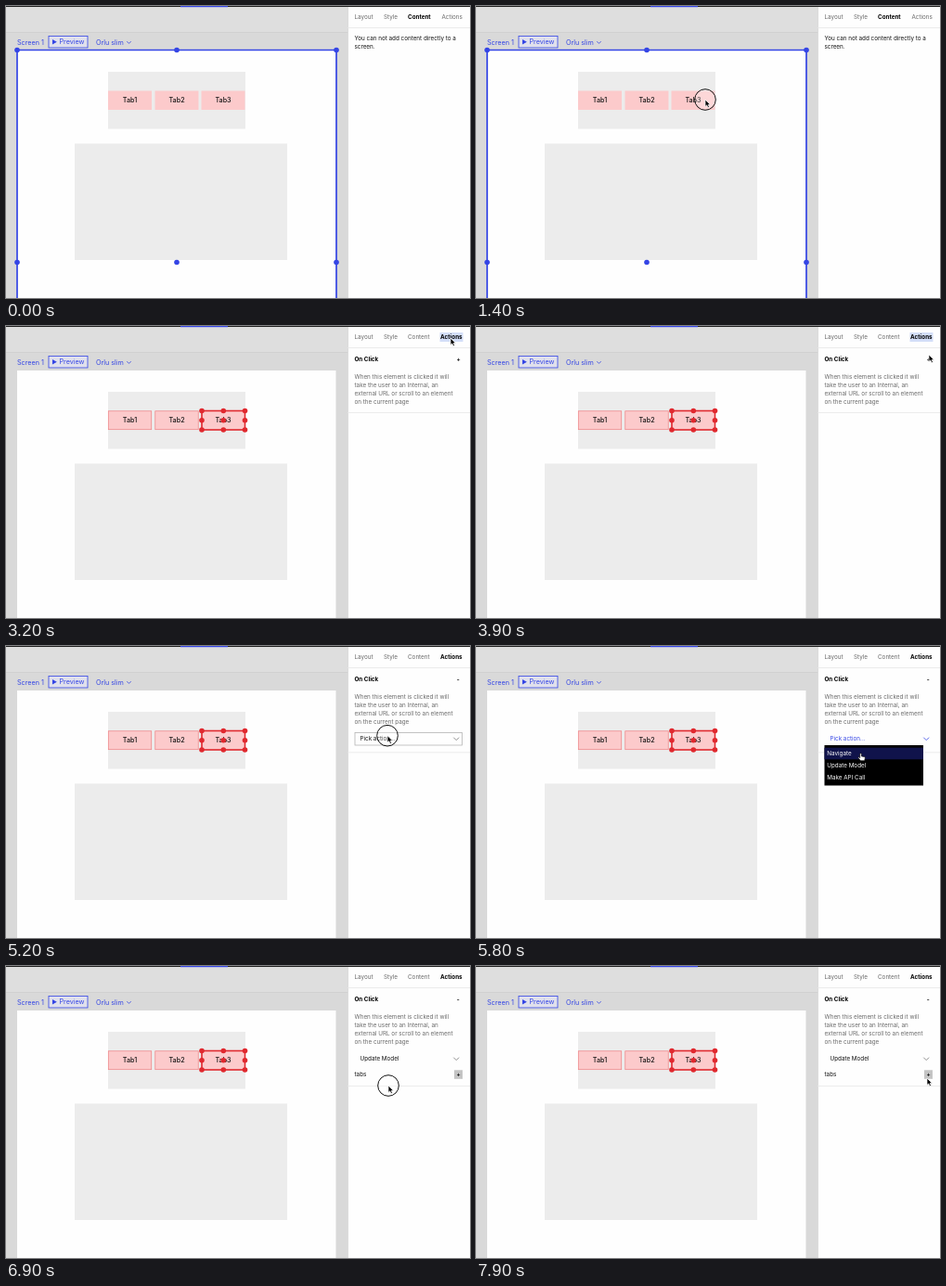
Recreate the animation shown at these times as an HTML page. Size 500 by 315 pixels, loop 8000 ms.

```html
<!DOCTYPE html>
<html lang="en">
<head>
<meta charset="utf-8">
<title>Tab action setup</title>
<style>
html, body { margin: 0; width: 100%; height: 100%; overflow: hidden; background: #fff; }
svg { display: block; width: 500px; height: 315px; }
text { font-family: Inter, "Open Sans", sans-serif; font-size: 6.3px; white-space: pre; }
</style>
</head>
<body>
<svg id="stage" viewBox="0 0 500 315"></svg>
<script>
const LOOP = 8000, STEP = 100;
const BLUE = '#3445e5', RED = '#e0282e', GREY = '#686868', INK = '#111';
const stage = document.getElementById('stage');

function add(parent, tag, attrs, content) {
  const el = document.createElementNS('http://www.w3.org/2000/svg', tag);
  for (const key in attrs) el.setAttribute(key, attrs[key]);
  if (content) el.textContent = content;
  parent.appendChild(el);
  return el;
}
const group = (parent = stage) => add(parent, 'g', {});
const rect = (p, x, y, width, height, fill, more) =>
  add(p, 'rect', { x, y, width, height, fill, ...more });
const dot = (p, cx, cy, r, fill) => add(p, 'circle', { cx, cy, r, fill });
const path = (p, d, stroke, width = 1, fill = 'none') =>
  add(p, 'path', { d, stroke, 'stroke-width': width, fill });
// y is the vertical middle of the capitals
const text = (p, x, y, str, fill = INK, size = 6.3, weight = 400, more) =>
  add(p, 'text', { x, y: y + size * 0.36, fill, 'font-weight': weight,
    style: `font-size:${size}px`, ...more }, str);
const lines = (p, x, y, gap, fill, rows) =>
  rows.forEach((row, i) => text(p, x, y + i * gap, row, fill));

// Editor canvas
rect(stage, 0, 0, 368, 315, '#d9d9d9');
rect(stage, 0, 0, 368, 28, '#dedede');
rect(stage, 0, 28, 368, 1, '#d0d0d0');
rect(stage, 12, 48, 343.5, 267, '#fefefe');
rect(stage, 46, 32.5, 42, 12.5, '#e0e0ec', { stroke: BLUE, 'stroke-width': 0.8 });
path(stage, 'M50 36v5.6l4.8-2.8z', 'none', 0, BLUE);
text(stage, 12, 39, 'Screen 1', BLUE, 7.2);
text(stage, 57.5, 38.8, 'Preview', BLUE, 7.2);
text(stage, 97, 39, 'Orlu slim', BLUE, 7.2);
path(stage, 'M130.3 38.2l2.2 2.2 2.2-2.2', BLUE, 0.8);

rect(stage, 110, 71, 148, 61.5, '#ececec');
rect(stage, 74, 148.5, 229, 125.5, '#ececec');
const tabBoxes = [110, 160.5, 210.5].map((x, i) => {
  const box = rect(stage, x, 91.5, 47, 20.5, '#fccacb');
  text(stage, x + 23.5, 101.5, 'Tab' + (i + 1), INK, 7.2, 500, { 'text-anchor': 'middle' });
  return box;
});

function handles(p, xs, ys, color) {
  for (const x of xs) for (const y of ys) dot(p, x, y, 2.8, color);
}
const screenSel = group();
path(screenSel, 'M12 315V47.5H356V315', BLUE, 1.7);
handles(screenSel, [12, 184, 356], [47.5], BLUE);
handles(screenSel, [12, 184, 356], [276.5], BLUE);

const tabSel = group();
for (const x of [110, 160.5])
  rect(tabSel, x + 0.3, 91.8, 46.4, 19.9, 'none', { stroke: '#ec8588', 'stroke-width': 0.7 });
rect(tabSel, 211, 91.5, 46.5, 20.5, 'none', { stroke: RED, 'stroke-width': 1.6 });
handles(tabSel, [211, 234.3, 257.5], [91.5, 101.7, 112], RED);

// Side panel
rect(stage, 368, 0, 132, 315, '#fefefe');
rect(stage, 368, 0, 0.8, 315, '#d4d4d4');
rect(stage, 368, 23, 132, 0.8, '#e6e6e6');
rect(stage, 0, 0, 500, 1, '#222');
rect(stage, 188, 0, 51, 1.2, BLUE);
const focus = rect(stage, 467.5, 7, 25, 10, '#d3def8');
text(stage, 375.5, 12, 'Layout', GREY);
text(stage, 407, 12, 'Style', GREY);
const contentOn = text(stage, 433, 12, 'Content', '#000', 6.3, 700);
const contentOff = text(stage, 433, 12, 'Content', GREY);
const actionsOn = text(stage, 468, 12, 'Actions', '#000', 6.3, 700);
const actionsOff = text(stage, 469.5, 12, 'Actions', GREY);

const emptyPanel = group();
lines(emptyPanel, 375.5, 35, 9, INK, ['You can not add content directly to a', 'screen.']);

const modelPanel = group();
for (const [name, x, w] of [['Text', 381, 13], ['Api', 428, 10], ['Icons', 445, 17], ['Media', 468, 20]]) {
  text(modelPanel, x, 30.5, name, GREY);
  rect(modelPanel, x, 35.5, w, 0.7, '#aaa');
}
text(modelPanel, 401, 30.5, 'Model', '#000', 6.3, 700);
rect(modelPanel, 400.5, 35.3, 21, 1.3, '#000');
text(modelPanel, 375.5, 49.5, 'Model', '#000', 6.3, 700);
rect(modelPanel, 376, 61, 115.5, 35.5, '#fefefe', { stroke: '#c4c4c4', 'stroke-width': 0.7 });
rect(modelPanel, 380, 65.5, 4.6, 4.6, '#777', { rx: 1 });
rect(modelPanel, 380, 71.3, 4.6, 4.6, '#777', { rx: 1 });
dot(modelPanel, 388, 67.8, 2.3, '#777');
rect(modelPanel, 385.8, 71.3, 4.6, 4.6, '#777', { rx: 1 });
text(modelPanel, 392, 70.5, 'tabs', GREY);
path(modelPanel, 'M385 80.8h3.4l2.4 2.4v6.2h-5.8zM388.2 80.8v2.6h2.6', '#222', 0.8);
text(modelPanel, 395, 85, 'selectedTab');
text(modelPanel, 375.5, 107.5, 'Validations', '#000', 6.3, 700);
rect(modelPanel, 375.5, 119, 116.5, 18, '#bebebe');
text(modelPanel, 380.5, 128, 'No fields with validations in model');
lines(modelPanel, 375.5, 148.5, 8.5, INK, ['Setup the state of your application', 'using the Model Editor']);

const actionPanel = group();
text(actionPanel, 375.5, 36, 'On Click', '#000', 6.3, 700);
lines(actionPanel, 375.5, 55, 9, GREY, ['When this element is clicked it will',
  'take the user to an Internal, an', 'external URL or scroll to an element', 'on the current page']);
const closedSign = text(actionPanel, 485.5, 36, '+', INK, 6.3, 600);
const openSign = text(actionPanel, 485.8, 36, '-', INK, 6.3, 700);
const closedLine = rect(actionPanel, 368, 93, 132, 0.8, '#e8e8e8');
const openLine = rect(actionPanel, 368, 114.5, 132, 0.8, '#e8e8e8');
const pickBox = rect(actionPanel, 376, 93.5, 115.5, 13.5, '#fefefe', { stroke: '#aaa', 'stroke-width': 0.7 });
const pickText = text(actionPanel, 381.5, 100.2, 'Pick action...');
const chevron = path(actionPanel, 'M482.3 98.7l2.9 2.9 2.9-2.9', '#777', 0.8);

const menu = group();
rect(menu, 375.5, 107, 106.5, 43.5, '#000');
const rowY = [116, 128.7, 141.5];
const hover = rect(menu, 375.5, 0, 106.5, 12.6, '#10134b');
['Navigate', 'Update Model', 'Make API Call'].forEach((s, i) => text(menu, 378.3, rowY[i], s, '#fff'));

const modelRow = group();
text(modelRow, 381.5, 100.2, 'Update Model');
text(modelRow, 375.5, 117, 'tabs');
rect(modelRow, 483, 112.3, 9, 9.5, '#c4c4c4');
text(modelRow, 485.5, 117, '+', INK, 6.3, 600);
rect(modelRow, 368, 129, 132, 0.8, '#e8e8e8');

// Pointer, drawn with its tip at 0,0
const pointer = group();
const ring = add(pointer, 'circle', { cx: 0, cy: 0, r: 11.3, fill: '#fff', 'fill-opacity': 0.25, stroke: '#111', 'stroke-width': 1 });
const arrow = path(pointer, 'M0 0v7.4l1.7-1.5 1.3 2.8 1.4-.6-1.2-2.7h2.3z', '#fff', 0.7, '#000');
const hand = path(pointer, 'M-1.3-3.2q.9-1 1.7 0v2.6l3.3.7q.8.3.6 1.3l-.6 2.9h-4.2l-2.8-3.2q.1-1.1 1-.6l1 .7z', '#111', 0.7, '#fff');

// time, x, y
const route = [
  [700, 330, 322], [1250, 247, 101], [1600, 247, 101], [2300, 477, 24], [2700, 479, 13],
  [3300, 479, 13], [3900, 488, 31], [4100, 487, 36], [4400, 487, 36], [5000, 411, 96],
  [5500, 411, 98], [6100, 419, 141], [6400, 420, 142], [6700, 412, 129], [7000, 412, 129],
  [7600, 486, 121], [8000, 486, 121]
];
const clicks = [[1300, 1600], [2900, 3200], [4100, 4300], [5100, 5400], [6800, 7000]];

function pointerAt(t) {
  if (t < route[0][0]) return null;
  const i = route.findIndex(k => k[0] > t);
  const [t0, x0, y0] = route[i - 1], [t1, x1, y1] = route[i];
  const u = (t - t0) / (t1 - t0), e = u * u * (3 - 2 * u);
  return [x0 + (x1 - x0) * e, y0 + (y1 - y0) * e];
}
const show = (on, ...els) => els.forEach(el => { el.style.display = on ? '' : 'none'; });

function draw(t) {
  const selected = t >= 1600, actions = t >= 3100, open = t >= 4300;
  const menuOpen = t >= 5400 && t < 6900, chosen = t >= 6900;
  show(!selected, screenSel, emptyPanel);
  show(selected, tabSel);
  show(selected && !actions, modelPanel);
  show(!actions, contentOn, actionsOff);
  show(actions, contentOff, actionsOn, actionPanel);
  show(actions && !open, focus, closedSign, closedLine);
  show(open, openSign, chevron);
  show(open && !chosen, openLine, pickText);
  show(open && !menuOpen && !chosen, pickBox);
  show(menuOpen, menu);
  show(chosen, modelRow);
  pickText.setAttribute('fill', menuOpen ? BLUE : INK);
  chevron.setAttribute('stroke', menuOpen ? BLUE : '#777');

  const pos = pointerAt(t);
  show(pos, pointer);
  if (!pos) return;
  const [x, y] = pos;
  const onMenu = menuOpen && y > 107;
  pointer.setAttribute('transform', `translate(${x} ${y})`);
  show(clicks.some(([a, b]) => t >= a && t < b), ring);
  show(onMenu, hand);
  show(!onMenu, arrow);
  show(onMenu, hover);
  hover.setAttribute('y', rowY[y < 122.4 ? 0 : y < 135 ? 1 : 2] - 6.3);
}

const start = performance.now();
function tick() {
  const t = (performance.now() - start) % LOOP;
  draw(Math.floor(t / STEP) * STEP);
  requestAnimationFrame(tick);
}
draw(0);
tick();
</script>
</body>
</html>
```
